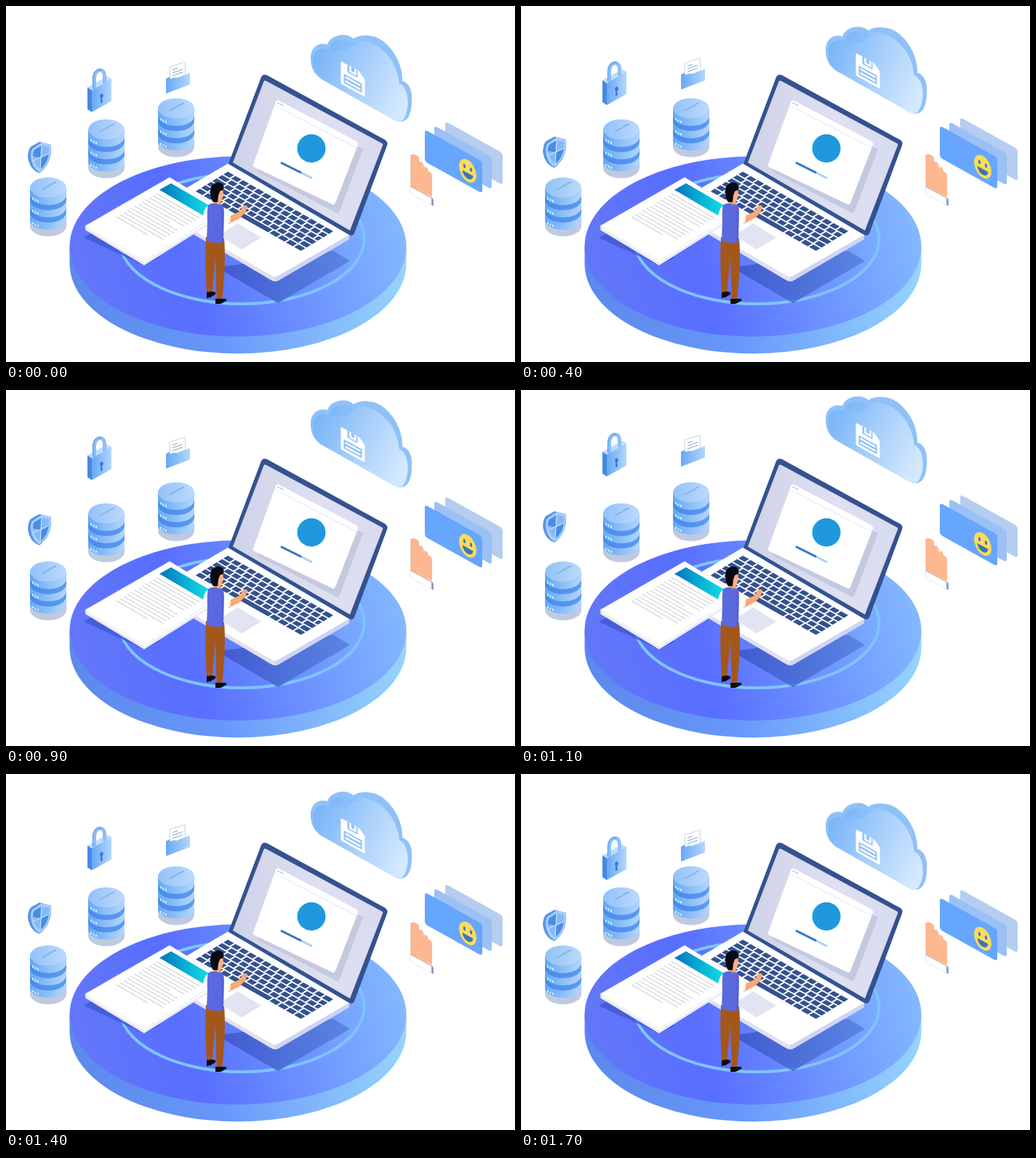
Recreate the animation shown at these times as an HTML page. Size 700 px wide and 490 px high, loop 1800 ms.

```html
<!DOCTYPE html>
<html lang="en">
<head>
<meta charset="utf-8">
<title>Cloud workspace</title>
<style>
html, body { margin: 0; width: 100%; height: 100%; overflow: hidden; background: #fff; }
svg { display: block; width: 700px; height: 490px; }
</style>
</head>
<body>
<svg viewBox="0 0 700 490">
<defs>
  <linearGradient id="top" x1="0" y1=".5" x2="1" y2=".36"><stop offset="0" stop-color="#6277f8"/><stop offset=".32" stop-color="#586eff"/><stop offset="1" stop-color="#84baff"/></linearGradient>
  <linearGradient id="side"><stop offset="0" stop-color="#5c88ec"/><stop offset=".45" stop-color="#6797f9"/><stop offset="1" stop-color="#96d4fe"/></linearGradient>
  <linearGradient id="shade"><stop offset="0" stop-color="#3a53c6"/><stop offset="1" stop-color="#5680de"/></linearGradient>
  <linearGradient id="pale"><stop offset="0" stop-color="#67a7f5"/><stop offset="1" stop-color="#b3d7fd"/></linearGradient>
  <linearGradient id="cap"><stop offset="0" stop-color="#92c2fa"/><stop offset="1" stop-color="#bbdafc"/></linearGradient>
  <linearGradient id="band"><stop offset="0" stop-color="#4a8ae8"/><stop offset="1" stop-color="#5b9bf0"/></linearGradient>
  <linearGradient id="cloud" x1="0" y1=".3" x2="1" y2=".7"><stop offset="0" stop-color="#7ab6f8"/><stop offset=".5" stop-color="#a9d0fb"/><stop offset="1" stop-color="#d5e9fe"/></linearGradient>
  <linearGradient id="screen"><stop offset="0" stop-color="#cfd2e9"/><stop offset=".6" stop-color="#dfe0f2"/><stop offset="1" stop-color="#d8dbef"/></linearGradient>
  <linearGradient id="cyan"><stop offset="0" stop-color="#0a70bd"/><stop offset=".55" stop-color="#05b6d6"/><stop offset="1" stop-color="#1ae0e8"/></linearGradient>
  <g id="database">
    <path d="M-25 22v36a25 14 0 0 0 50 0v-36z" fill="#c1c9df" transform="translate(0 9)"/>
    <path d="M-25 14v43a25 14 0 0 0 50 0v-43z" fill="url(#band)"/>
    <path id="tier" d="M-25 14a25 14 0 0 0 50 0v10a25 14 0 0 1-50 0z" fill="url(#pale)"/>
    <use href="#tier" y="17"/><use href="#tier" y="34"/>
    <ellipse cy="14" rx="25" ry="14" fill="url(#cap)"/>
    <path d="M-9 17l20-11" stroke="#8db7e9" stroke-width="2.5"/>
    <path id="lights" d="M-21 27.500v3M-17.500 29.500v3M-14 31v3" stroke="#c9fbff" stroke-width="1.800"/>
    <use href="#lights" y="17"/><use href="#lights" y="34"/>
  </g>
  <rect id="card" width="79" height="44" rx="4"/>
</defs>

<g id="platform">
  <path d="M87.500 331v23.500a231.500 124 0 0 0 463 0v-23.500z" fill="url(#side)"/>
  <ellipse cx="319" cy="331" rx="231.500" ry="124" fill="url(#top)"/>
  <ellipse cx="324" cy="320.500" rx="168.500" ry="89.500" fill="none" stroke="#7fc4fc" stroke-width="4"/>
</g>

<g id="laptop">
  <path d="M290 360L374 409 473 351 450 337z" fill="url(#shade)" opacity=".85"/>
  <path d="M203 277v5L364 377q6 4 12 0L472 321v-7L370 368z" fill="#dfe2f5"/>
  <path d="M305 217L472 315 375 371q-5 3-10 0L203 277z" fill="#fff"/>
  <path d="M472 315v6L376 377q-3 2-6 2v-6q3 0 5-2z" fill="#cfd5f0"/>
  <path d="M293 316L319 299 351 319 324 335z" fill="#e2e4f3"/>
  <path id="keys" transform="matrix(1 .566 -1.080 .660 305 228)" fill="#34528e"/>
  <path d="M306 217L350.500 99q2-6 8-4L521 184q5 3 3 8L479 313q-2 4-7 2z" fill="#34528f"/>
  <path d="M312 215.500L354.500 104q1-2 3-1L517 189q2 1 1 3L473 309z" fill="url(#screen)"/>
  <path d="M376 138L491 197 459 282q-2 4-6 2L346 228z" fill="#c4c9df"/>
  <path d="M371 132q1-3 4-2L482 186q3 2 2 5L453 271q-1 3-4 2L342 222q-3-1-2-4z" fill="#fff"/>
  <path d="M370 137L482 195" stroke="#e2e5ef"/>
  <path d="M374 133.500l8 4" stroke="#8ba1cb" stroke-width="1.600" stroke-dasharray="1.600 1.500"/>
  <circle cx="420" cy="196" r="19.500" fill="#1f98e0"/>
  <path d="M378 215.500L421 237" stroke="#a9d2f7" stroke-width="3"/>
  <path d="M378 215.500L406 229.500" stroke="#3676c9" stroke-width="3"/>
</g>

<g id="document">
  <path d="M107 319L122 310 212 346 190 357z" fill="#3f57d2" opacity=".75"/>
  <path d="M108.500 308L225 240 300 288 190 357z" fill="#eceef5"/>
  <path d="M108.500 305.500L225 238 300 286 190 354z" fill="#fff" stroke="#d8dbe6" stroke-width=".8"/>
  <path d="M108.500 303L225 236 300 282 190 350.500z" fill="#fff" stroke="#e2e4ec" stroke-width=".8"/>
  <path d="M211 253L227 244 282 276 274 290z" fill="url(#cyan)"/>
  <path id="lines" fill="none" stroke="#c3c6cf"/>
</g>

<g id="person">
  <path d="M275 318L300 320Q303 355 297 404L289.500 404 288 346 283.500 395 276 395Q273 355 275 318z" fill="#a4571b"/>
  <path d="M276 394l7-1 5 1v3l-7 4-5 1zM288 403l7 0 8 0v3l-8 4-7 0z" fill="#090b14"/>
  <path d="M304 291L321 283 327 274 332 275 330 283 322 292 306 300z" fill="#f9a875"/>
  <path d="M295 279q7 0 14 11l-1 8-10 2zM277 275q-8 8-5 23l6 4z" fill="#fff"/>
  <path d="M286 264l9-4 1 14-8 5z" fill="#f4a06c"/>
  <path d="M278 274q6-4 11-2 4 2 8 1 3 3 3 12l-1 40q-11 3-23-2l1-28q-1-13 1-21z" fill="#5b69df"/>
  <path d="M296 278q3 18 1 47" stroke="#4956c9" fill="none"/>
  <path d="M291 252L298 249 299 261 296 269 290 271z" fill="#fbb283"/>
  <path d="M281 258C280 248 285 243 292 243 298 243 301 248 299 253L294 255 292 261 291 270 285 270Q281 265 281 258z" fill="#080a14"/>
</g>

<use href="#database" x="58" y="236"/>
<use href="#database" x="138" y="156"/>
<use href="#database" x="234" y="127"/>

<g data-lift="20">
  <path d="M30 207Q31 195 35 193L46 187 62 191Q64 216 46 230 32 225 30 207z" fill="#5a94e4"/>
  <path d="M34 207Q34 198 37 196L49 188 62 191Q63 216 46 229 35 222 34 207z" fill="#a6cefb"/>
  <path d="M37 207Q37 200 39 198L49 192 48 209zM48 209L59 203Q57 217 47 225z" fill="#4b8ee6"/>
  <path d="M49 192L59 194V203L48 209zM48 209L47 225Q38 218 37 207z" fill="#85b9f6"/>
  <path d="M49 192L47 225M37 213L59 203" stroke="#dbecff"/>
</g>

<g data-lift="27">
  <path d="M112 112L139 97 145 100 118 116z" fill="#bddcfd"/>
  <path d="M121.500 114V101C121 86 135 84 135.500 96V106" fill="none" stroke="#8ebff7" stroke-width="5"/>
  <path d="M119.500 114V100C120 88 128 86 132 89" fill="none" stroke="#6aa5ee" stroke-width="1.500"/>
  <path d="M112 112L118 116V146L112 142z" fill="#4688e2"/>
  <path d="M118 116L145 100V131L118 146z" fill="url(#pale)"/>
  <path d="M129 124q1-4 4-3 2 3-1 6l1 5-3 2v-7z" fill="#3b78d2"/>
</g>

<g data-lift="15">
  <path d="M220 100L226 97V108L220 112z" fill="#6aa6ee"/>
  <path d="M225 84L246 77 247 99 226 108z" fill="#fff" stroke="#c5d4e8"/>
  <path d="M229 88l7-2.500M229 92l14-5M229 96l14-5" stroke="#8c9fbd"/>
  <path d="M220 102.500L231 98.500 235 99 253 92V108L220 120.500z" fill="url(#pale)"/>
</g>

<g data-lift="31">
  <path d="M419 73C418 59 428 49 442 53 446 40 467 35 478 45 486 39 500 40 509 43 530 52 546 79 545 103 556 107 559 118 558 131 558 146 554 155 548 158Q542 161 534 157L433 100Q419 90 419 73z" fill="#8fc1f8"/>
  <path d="M422 77C421 64 431 55 445 60 447 46 463 43 473 53 490 37 536 58 541 107 553 110 558 142 545 158Q540 160 534 157L433 100Q423 93 422 77z" fill="url(#cloud)"/>
  <path d="M445 60Q447 47 461 47L487 52Q476 52 470 62z" fill="#76b1f5" opacity=".35"/>
  <g transform="matrix(1 .55 0 1 460.500 76)">
    <path d="M2 0H25L33 7V29Q33 31 31 31H2Q0 31 0 29V2Q0 0 2 0z" fill="#fff"/>
    <path d="M9 0H23V10H9zM4 15H29V27.500H4z" fill="#91c2f9"/>
    <path d="M13 0V7H20V0M6 18.500H27M6 24H27" fill="none" stroke="#fff" stroke-width="2.600"/>
  </g>
</g>

<g data-lift="15">
  <use href="#card" fill="#b4cdf1" transform="matrix(1 .556 0 1 604 158.500)"/>
  <use href="#card" fill="#9bc0f5" transform="matrix(1 .556 0 1 589 164.500)"/>
  <g transform="matrix(1 .556 0 1 576 170)">
    <use href="#card" fill="#66a6fe"/>
    <ellipse cx="59" cy="24" rx="12" ry="15" fill="#fbdc59"/>
    <g fill="#3f73bd"><ellipse cx="54.500" cy="20" rx="1.600" ry="2.800"/><ellipse cx="63.500" cy="20" rx="1.600" ry="2.800"/><path d="M51.500 27H66.500Q65 35 59 35 53 35 51.500 27z"/></g>
  </g>
</g>

<g id="hand">
  <path d="M557 205Q561 202 567 207L568 215Q573 212 575 222 580 220 581 228 586 228 586 235V263L557 248z" fill="#fdb88f"/>
  <path d="M557 205V248M567 208V220" stroke="#eba883" fill="none"/>
  <path d="M556 248L587 265V275L556 258z" fill="#fff" stroke="#e3dee6" stroke-width=".8"/>
  <path d="M585 265l3 1v9l-3-1z" fill="#8c9bc9"/>
  <path d="M556 248L587 265" stroke="#c98f7d"/>
</g>
</svg>
<script>
const key = (x, y, w) => `M${x} ${y}h${w}v5.500h${-w}z`;

function keyboard() {
  let path = "";
  for (let row = 0; row < 5; row++) {
    const first = 8.5 + row % 4 * 2.5;
    path += key(0, row * 7.1, first);
    let x = first + 2;
    for (; x < 132; x += 10.4) path += key(x, row * 7.1, 8.4);
    path += key(x, row * 7.1, 145 - x);
  }
  for (let col = 0; col < 13; col++) {
    if (col < 4 || col > 8) path += key(col * 11.3, 35.5, 9.3);
  }
  return path + key(45.2, 35.5, 54.5);
}

function textLines() {
  let path = "";
  for (let i = 0; i < 12; i++) path += `M${207 - i * 5} ${258 + i * 2.9}l${i % 6 === 5 ? 43 : 59} ${i % 6 === 5 ? 25 : 34}`;
  return path;
}

document.querySelector("#keys").setAttribute("d", keyboard());
document.querySelector("#lines").setAttribute("d", textLines());

const floating = document.querySelectorAll("[data-lift]");

// Slow rise over eleven steps, quicker fall over six.
function draw() {
  const step = Math.floor(performance.now() % 1800 / 100);
  const height = step <= 11 ? step / 11 : (17 - step) / 6;
  for (const part of floating) {
    part.setAttribute("transform", `translate(0 ${-part.dataset.lift * height})`);
  }
  requestAnimationFrame(draw);
}
draw();
</script>
</body>
</html>
```
